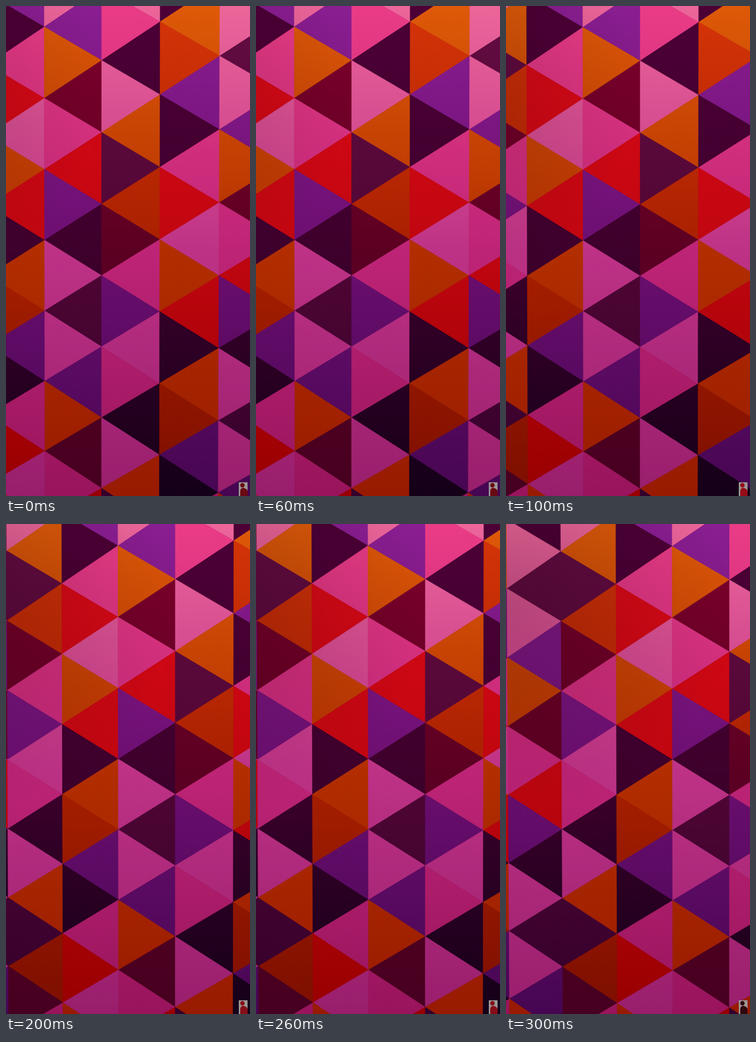
These frames come from a looping animation (500x1000 px, 400 ms). An HTML page:

```html
<!DOCTYPE html>
<html lang="en">
<head>
<meta charset="utf-8">
<title>Sliding triangles</title>
<style>
html, body { margin: 0; width: 100%; height: 100%; overflow: hidden; background: #30001c; }
svg { display: block; width: 100vw; height: 100vh; }
</style>
</head>
<body>
<svg id="stage" viewBox="0 0 500 1000" preserveAspectRatio="none">
  <defs id="defs">
    <radialGradient id="shade" gradientUnits="userSpaceOnUse" cx="-262" cy="150" r="460">
      <stop offset="0" stop-color="#100008" stop-opacity="0.2"/>
      <stop offset="1" stop-color="#100008" stop-opacity="0"/>
    </radialGradient>
  </defs>
  <g id="wall">
    <g id="tiles"></g>
    <rect x="-400" y="-20" width="700" height="1040" fill="url(#shade)"/>
  </g>
  <rect x="477" y="972" width="18" height="28" fill="#9a9694"/>
  <g id="figure">
    <circle cx="484.5" cy="978" r="4.5"/>
    <path d="M480 1000V989Q481 984 486 983L491 985Q495 987 495 991V1000Z"/>
  </g>
</svg>
<script>
const NS = 'http://www.w3.org/2000/svg';
const $ = id => document.getElementById(id);
const mod = (a, n) => ((a % n) + n) % n;

function add(parent, name, attrs) {
  const el = document.createElementNS(NS, name);
  for (const key in attrs) el.setAttribute(key, attrs[key]);
  return parent.appendChild(el);
}

// Shades of each paint at the top, middle and bottom of the wall
const paints = {
  O: ['#de5a08', '#b22e00', '#981a00'], // orange
  q: ['#d63408', '#a82000', '#7c0e00'], // rust
  R: ['#dc0a18', '#c00610', '#980000'], // red
  M: ['#ea3c86', '#be2476', '#98145c'], // magenta
  L: ['#ec669a', '#be3286', '#981e6c'], // light pink
  V: ['#8a1e92', '#6c0e70', '#460652'], // violet
  D: ['#4c0036', '#3e002c', '#140018'], // dark
  K: ['#80002c', '#5c0022', '#460020'], // maroon
  U: ['#640c42', '#500634', '#34002c']  // plum
};

for (const key in paints) {
  const grad = add($('defs'), 'linearGradient', {
    id: key, gradientUnits: 'userSpaceOnUse', x1: 0, y1: 0, x2: 0, y2: 1000
  });
  paints[key].forEach((color, i) => add(grad, 'stop', { offset: i / 2, 'stop-color': color }));
}

// Corner of the slightly tilted lattice: whole columns, half-step rows
function corner(col, row) {
  const n = row / 2;
  const y = 477.8 - 0.7 * col + (144.3 + 1.5 * col) * n - 0.27 * n * n;
  const tilt = (1.3 - 1.55 * col) / 1000;
  return [79 + 115.7 * col + 1.15 * col * col + tilt * (y - 500), y];
}

// Three colour cycles run down the strips; every second set of three starts 3 rows lower
const cycles = ['LMDLOUqKMV', 'DOqVDMRLOR', 'DLULVOKMRV'];

function colorOf(col, row) {
  const strip = mod(col + 2, 6);
  const drop = strip < 3 ? 0 : 3;
  return cycles[strip % 3][mod(row - drop, 10)];
}

for (let col = -4; col < 4; col++) {
  for (let row = -9; row <= 9; row++) {
    const pointsLeft = mod(col + row, 2) === 0;
    const tip = pointsLeft ? col : col + 1;
    const base = pointsLeft ? col + 1 : col;
    const paint = `url(#${colorOf(col, row)})`;
    add($('tiles'), 'polygon', {
      points: [corner(tip, row), corner(base, row - 1), corner(base, row + 1)].join(' '),
      fill: paint, stroke: paint, 'stroke-width': 0.6, 'stroke-linejoin': 'round'
    });
  }
}

// The wall jumps sideways every 100 ms, sinking a little as it goes
const poses = [
  { x: 0, tint: '#6a0a12' },
  { x: 79, tint: '#960c18' },
  { x: 151, tint: '#860e18' },
  { x: 262, tint: '#300810' }
];

function draw(ms) {
  const { x, tint } = poses[Math.floor(ms / 100) % poses.length];
  $('wall').setAttribute('transform', `translate(${x} ${x * 0.0115})`);
  $('figure').setAttribute('fill', tint);
}

let start;
function tick(now) {
  if (start === undefined) start = now;
  draw(now - start);
  requestAnimationFrame(tick);
}
draw(0);
requestAnimationFrame(tick);
</script>
</body>
</html>
```
